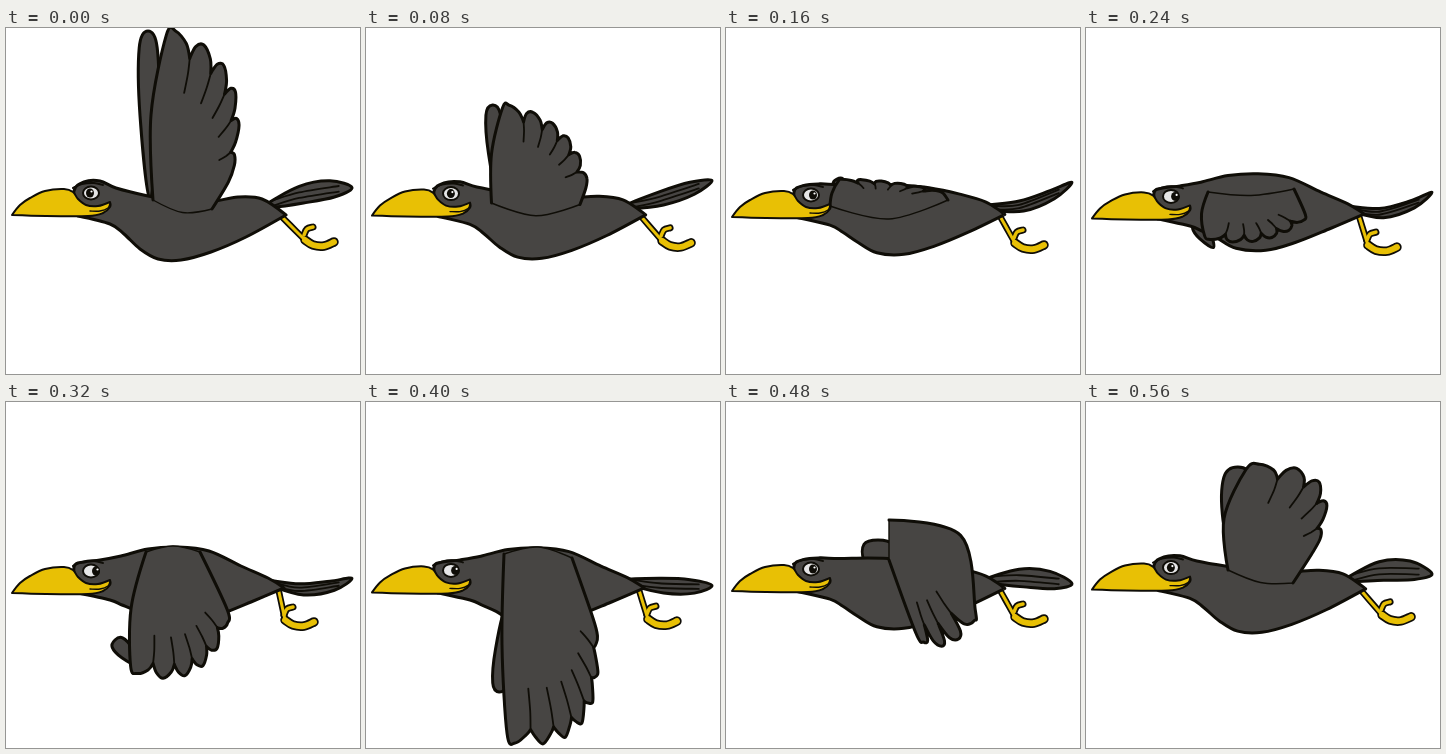
Recreate the animation shown at these times as an HTML page. Size 354 by 346 pixels, loop 640 ms.

```html
<!DOCTYPE html>
<html lang="en">
<head>
<meta charset="utf-8">
<title>Flying crow</title>
<style>
  html, body { margin: 0; width: 100%; height: 100%; overflow: hidden; background: #fff; }
  svg { display: block; width: 100%; height: 100%; }
  path { stroke-linejoin: round; stroke-linecap: round; }
</style>
</head>
<body>
<svg id="stage" viewBox="0 0 354 346"></svg>
<script>
const POSES = 8, STEP = 80;
const INK = '#0f0d07', COAT = '#474543', GOLD = '#e8c005';

// Blends numbers, points and nested groups of them.
function mix(a, b, t) {
  if (typeof a === 'number') return a + (b - a) * t;
  if (Array.isArray(a)) return a.map((v, i) => mix(v, b[i], t));
  return Object.fromEntries(Object.keys(a).map(k => [k, mix(a[k], b[k], t)]));
}

// Smooth path through [x, y, sharp?] points.
function curve(pts, closed) {
  const n = pts.length;
  const at = i => closed ? pts[(i + n) % n] : pts[Math.max(0, Math.min(n - 1, i))];
  const handle = (i, sign) => [0, 1].map(c =>
    (at(i)[c] + (at(i)[2] ? 0 : (at(i + 1)[c] - at(i - 1)[c]) * sign / 6)).toFixed(1));
  let d = `M${pts[0].slice(0, 2)}`;
  for (let i = 0; i < (closed ? n : n - 1); i++)
    d += `C${handle(i, 1)} ${handle(i + 1, -1)} ${at(i + 1).slice(0, 2)}`;
  return d;
}

const shape = (pts, fill = COAT, width = 3) =>
  `<path d="${curve(pts, true)}Z" fill="${fill}" stroke="${INK}" stroke-width="${width}"/>`;
const line = (pts, width = 1.8, color = INK) =>
  `<path d="${curve(pts)}" fill="none" stroke="${color}" stroke-width="${width}"/>`;
const oval = (x, y, rx, ry, fill, width = 0) =>
  `<ellipse cx="${x}" cy="${y}" rx="${rx}" ry="${ry}" fill="${fill}" stroke="${INK}" stroke-width="${width}"/>`;

const RAISED = [
  [68, 163], [78, 154], [94, 153], [110, 160], [142, 168], [172, 173], [203, 174], [232, 169], [256, 171],
  [280, 187, 1], [240, 209], [205, 224], [175, 232], [152, 231], [134, 221], [118, 206], [104, 196], [72, 188, 1]
];
const ARCHED = [
  [68, 165], [78, 160], [94, 158], [115, 154], [142, 147], [172, 145], [203, 149], [235, 164], [262, 176],
  [278, 186, 1], [245, 200], [210, 214], [180, 222], [150, 220], [130, 209], [116, 203], [104, 198], [72, 191, 1]
];
const BEAK = [
  [6, 188, 1], [14, 178], [24, 171], [39, 164], [58, 162], [67, 165], [72, 172], [80, 178], [92, 179],
  [104, 175, 1], [104, 180], [97, 186], [82, 189], [40, 189]
];

// root: where the wing meets the body; edge: quadratic arc along the feather tips.
const WINGS = {
  0: { root: [[147, 172], [206, 181]], edge: [[153, 2], [260, 24], [222, 160]],
       bow: 5, sag: 8, notch: .11, feathers: 6, far: [[144, 172], [142, 3]], farWidth: 18 },
  2: { root: [[104, 178], [222, 172]], edge: [[108, 152], [165, 150], [222, 166]],
       bow: 0, sag: 16, notch: .14, feathers: 6, far: [[122, 175], [111, 151]], farWidth: 11 },
  4: { root: [[140, 150], [194, 150]], edge: [[118, 264], [205, 300], [224, 205]],
       bow: -4, sag: -6, notch: .09, feathers: 6, far: [[133, 264], [109, 238]], farWidth: 14 },
  5: { root: [[138, 152], [206, 156]], edge: [[134, 334], [249, 363], [228, 212]],
       bow: 0, sag: -9, notch: .06, feathers: 7, far: [[140, 205], [133, 290]], farWidth: 14 },
  6: { root: [[163, 118], [163, 158]], edge: [[254, 204], [225, 262], [188, 232]],
       bow: 38, sag: 0, notch: .18, feathers: 4, far: [[152, 180], [152, 138]], farWidth: 28 },
  7: { root: [[142, 168], [207, 181]], edge: [[150, 66], [277, 52], [224, 158]],
       bow: 8, sag: 6, notch: .11, feathers: 5, far: [[150, 172], [152, 65]], farWidth: 28 }
};
const wingAt = k => WINGS[k] || mix(WINGS[k - 1], WINGS[k + 1], .5);

// Point beside the middle of a segment, pushed sideways.
function beside([ax, ay], [bx, by], push) {
  const len = Math.hypot(bx - ax, by - ay);
  return [(ax + bx) / 2 + (by - ay) / len * push, (ay + by) / 2 - (bx - ax) / len * push];
}

function farWing({ far: [base, tip], farWidth: w }) {
  const side = s => [mix(base, tip, .5), mix(base, tip, .9)].map(p => {
    const [dx, dy] = beside(base, tip, s * w / 2), [mx, my] = mix(base, tip, .5);
    return [p[0] + dx - mx, p[1] + dy - my];
  });
  return shape([base, ...side(1), tip, ...side(-1).reverse()]);
}

function nearWing({ root: [front, back], edge: [a, b, c], bow, sag, notch, feathers }) {
  const hub = mix(front, back, .5);
  const arc = (t, reach) => mix(hub, mix(mix(a, b, t), mix(b, c, t), t), reach);
  const outline = [[...front, 1], beside(front, a, bow)], marks = [];
  for (let i = 0; i < feathers; i++) {
    const t = s => (i + s) / feathers;
    outline.push(arc(t(.2), .98), arc(t(.5), 1.02), arc(t(.85), .97));
    if (i === feathers - 1) break;
    outline.push([...arc(t(1), 1 - notch), 1]);
    marks.push(line([arc(t(1), 1 - notch), arc(t(.95), .9 - notch), arc(t(.8), .78 - notch)]));
  }
  outline.push([...back, 1]);
  return shape([...outline, [hub[0], hub[1] + sag]], COAT, 1.4) + line(outline, 3) + marks.join('');
}

function tail(turn) {
  const root = [258, 178], tip = [346, 168 - 16 * turn(1.3)];
  const sag = 3 + 10 * turn(3), half = 7.5 - 2.5 * turn(3);
  const along = (t, w) => {
    const [x, y] = mix(root, tip, t);
    return [x, y + sag * 4 * t * (1 - t) + w * half];
  };
  const rib = w => line([.1, .4, .85].map(t => along(t, w)));
  return shape([root, along(.4, -.9), along(.75, -.9), tip, along(.8, .9), along(.45, 1), along(.1, .5)]) +
    rib(-.25) + rib(.35);
}

function leg(swing) {
  const hip = [275 + 2 * swing, 190], heel = [289 + 10 * swing, 215 - 3 * swing];
  const from = (x, y) => [heel[0] + x, heel[1] + y];
  const parts = [
    [[hip, mix(hip, heel, .6), heel], 3],
    [[heel, from(8, 5), from(19, 6), from(29, 2)], 6],
    [[from(-1, -5), from(2, -11), from(8, -13)], 3.5]
  ];
  return parts.map(([p, w]) => line(p, w + 3.5)).join('') + parts.map(([p, w]) => line(p, w, GOLD)).join('');
}

function head(swing) {
  const pupil = 87 - 3 * swing;
  return `<g transform="translate(0 ${1 - 2 * swing})">` + shape(BEAK, GOLD, 2) +
    line([[104, 176], [102, 181], [94, 184], [84, 184]], 1.4) +
    line([[67, 161], [76, 157], [88, 156], [97, 158]], 2) +
    oval(85, 166, 8, 6.5, '#e6e6e6', 2) + oval(pupil, 166, 4, 4.5, INK) +
    oval(pupil + 1.5, 164.5, 1.1, 1.1, '#fff') + '</g>';
}

function crow(k) {
  const turn = lag => Math.cos((k - lag) / POSES * 2 * Math.PI);
  const swing = turn(0), wing = wingAt(k);
  wing.feathers = Math.round(wing.feathers);
  const body = mix(RAISED, ARCHED, Math.min(1, .57 * (1 - swing)));
  return leg(swing) + tail(turn) + farWing(wing) + shape(body) + nearWing(wing) + head(swing);
}

const stage = document.getElementById('stage'), loop = STEP * POSES, share = 1 / POSES;
stage.innerHTML = Array.from({ length: POSES }, (_, k) => `<g class="pose">${crow(k)}</g>`).join('');
stage.querySelectorAll('.pose').forEach((pose, k) => pose.animate(
  [{ opacity: 1 }, { opacity: 1, offset: share }, { opacity: 0, offset: share }, { opacity: 0 }],
  { duration: loop, delay: k * STEP - (k ? loop : 0), iterations: Infinity }
));
</script>
</body>
</html>
```
